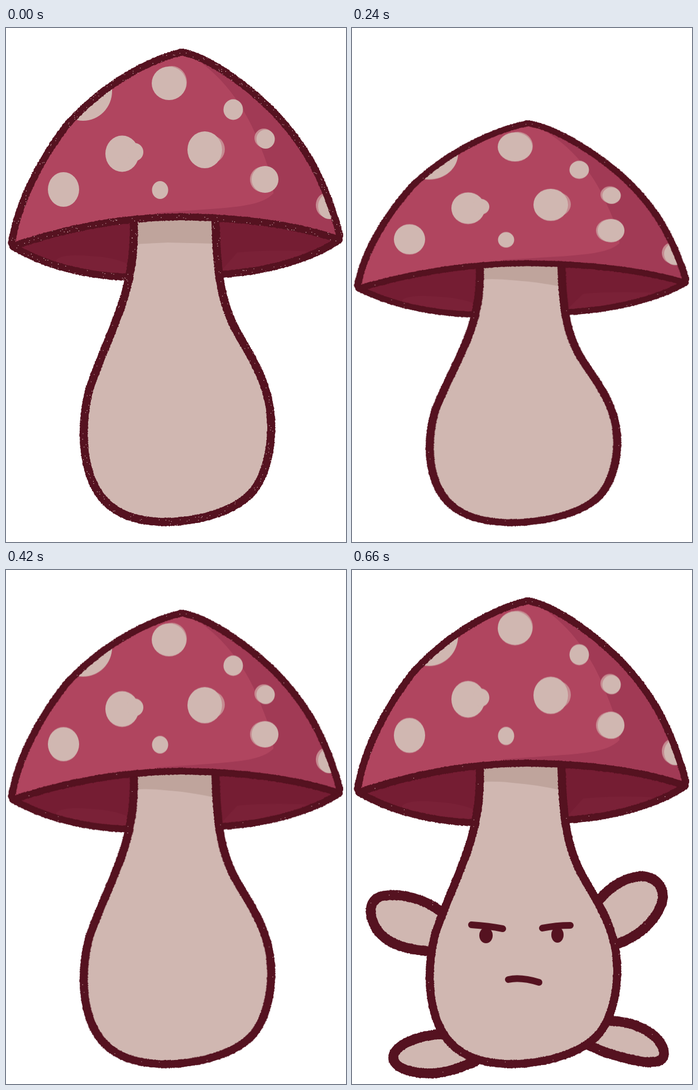
Write an HTML page that moves like this. It is 609 px wide and 920 px high and loops after 0.72 s.

```html
<!DOCTYPE html>
<html lang="en">
<head>
<meta charset="utf-8">
<title>Mushroom</title>
<style>
  html, body { margin: 0; width: 100%; height: 100%; overflow: hidden; background: #fff; }
  svg { display: block; }
  svg * { animation: 720ms step-end infinite; }

  .ink { fill: none; stroke: #551220; stroke-width: 14; stroke-linecap: round; stroke-linejoin: round; }
  .thin { stroke-width: 12; }
  .grain { fill: none; stroke: #551220; stroke-width: 2.4; stroke-linecap: round; }
  .speck { fill: none; stroke: #ecd0cf; stroke-width: 1.1; stroke-linecap: square; }
  .flesh { fill: #d0b7b1; }
  .limb .ink { fill: #d0b7b1; stroke-width: 17; animation-name: weight; }
  .halo { fill: #c58b91; }
  .face { fill: none; stroke: #551220; stroke-linecap: round; visibility: hidden; }
  .pupils { fill: #551220; stroke: none; transform-origin: 0 641px; animation-name: open; }

  #shroom { transform-origin: 0 892px; animation-name: squash; }
  #spots { transform-origin: 0 350px; animation-name: spread; }
  #limbs { visibility: hidden; animation-name: appear; }
  .limb { animation-name: grow; }
  .first { animation-name: first; }
  #tiny { animation-name: tiny; }
  #shut { animation-name: shut; }
  #grumpy { animation-name: grumpy; }

  @keyframes squash {
    0% { transform: scaleY(1); }
    8.333% { transform: scaleY(.98); }
    16.666% { transform: scaleY(.95); }
    25% { transform: scaleY(.915); }
    33.333% { transform: scaleY(.85); }
    41.666% { transform: scaleY(.782); }
    50% { transform: scaleY(.915); }
    58.333% { transform: scaleY(.96); }
    66.666% { transform: scaleY(.98); }
    75% { transform: scaleY(1.038); }
    83.333% { transform: scaleY(1.012); }
    91.666%, 100% { transform: scaleY(.986); }
  }
  @keyframes spread { 0% { transform: none; } 8.333%, 100% { transform: scaleY(1.024); } }
  @keyframes appear { 0% { visibility: hidden; } 66.666%, 100% { visibility: visible; } }
  @keyframes grow { 0% { transform: scale(.87, .92); } 75%, 100% { transform: none; } }
  @keyframes weight { 0% { stroke-width: 22; } 75%, 100% { stroke-width: 17; } }
  @keyframes first { 0% { visibility: visible; } 8.333%, 100% { visibility: hidden; } }
  @keyframes tiny { 0% { visibility: hidden; } 66.666% { visibility: visible; } 75%, 100% { visibility: hidden; } }
  @keyframes shut { 0% { visibility: hidden; } 75% { visibility: visible; } 83.333%, 100% { visibility: hidden; } }
  @keyframes grumpy { 0% { visibility: hidden; } 83.333%, 100% { visibility: visible; } }
  @keyframes open { 0% { transform: scaleY(.6); } 91.666%, 100% { transform: none; } }
</style>
</head>
<body>
<svg width="609" height="920" viewBox="0 0 609 920">
  <defs>
    <clipPath id="dome">
      <path d="M10 388C20 320 55 245 108 175C165 110 245 60 315 43C365 52 440 108 487 158C545 222 575 285 598 379C520 352 420 339 310 338C210 339 110 357 10 391Z"/>
    </clipPath>
  </defs>
  <g id="shroom">
    <g id="limbs" transform="matrix(1 0 0 1.014 0 -12.5)">
      <g class="limb" style="transform-origin:155px 605px">
        <path class="ink" d="M160 612C125 584 78 578 52 584C28 592 30 618 43 641C62 672 105 681 150 683"/>
      </g>
      <g class="limb" style="transform-origin:455px 545px">
        <path class="ink" d="M440 594C465 562 497 547 523 548C553 553 563 578 553 601C540 634 505 662 465 672"/>
      </g>
      <g class="limb" style="transform-origin:440px 735px">
        <path class="ink" d="M455 807C505 806 548 828 558 858C563 880 545 883 520 880C485 874 450 864 420 848"/>
      </g>
      <g class="limb" style="transform-origin:205px 867px">
        <path class="ink" d="M165 831C125 831 85 846 75 866C68 884 90 896 120 900C160 905 190 892 222 879"/>
      </g>
    </g>

    <path fill="#751d33" d="M12 391C110 357 210 339 310 338C420 339 520 352 597 379C550 412 470 436 385 441L218 446C140 443 70 425 12 391Z"/>
    <path fill="#7a2137" d="M88 418Q95 403 150 408Q190 410 216 421V442Q140 440 88 418ZM384 436L414 402Q470 396 540 400Q480 430 384 436Z"/>
    <path class="ink thin" d="M12 391C70 425 140 443 218 446"/>
    <path class="ink thin" d="M385 441C470 436 550 412 597 379"/>

    <path class="flesh" d="M229 342C230 400 224 440 212 480C197 532 170 585 149 648C137 695 136 745 146 785C163 856 212 886 295 884C370 880 430 855 452 815C477 770 482 700 465 648C452 605 430 575 408 533C385 485 378 440 375 342Z"/>
    <path fill="#bfa49c" d="M230 340H374V387Q330 377 290 374Q260 370 230 372Z"/>
    <path class="first" fill="#bfa49c" d="M230 350H374V386L290 384L230 387Z"/>
    <path class="ink" d="M229 342C230 400 224 440 212 480C197 532 170 585 149 648C137 695 136 745 146 785C163 856 212 886 295 884C370 880 430 855 452 815C477 770 482 700 465 648C452 605 430 575 408 533C385 485 378 440 375 342"/>

    <g clip-path="url(#dome)">
      <path fill="#b0455f" d="M0 30H609V400H0Z"/>
      <path fill="#a13a55" d="M325 45C390 85 425 140 447 190C465 235 479 270 479 296C462 314 430 319 380 323L270 331V400H609V45Z"/>
      <g id="spots">
        <g class="halo">
          <ellipse cx="297" cy="97" rx="27" ry="29"/>
          <ellipse cx="367" cy="217" rx="25" ry="25"/>
          <ellipse cx="462" cy="197" rx="17" ry="17"/>
          <ellipse cx="460" cy="271" rx="23" ry="23"/>
          <ellipse cx="574" cy="317" rx="19" ry="22"/>
        </g>
        <g class="flesh">
          <ellipse cx="292" cy="99" rx="31" ry="30"/>
          <ellipse cx="138" cy="113" rx="52" ry="53"/>
          <ellipse cx="208" cy="225" rx="30" ry="32.5"/>
          <ellipse cx="231" cy="222" rx="15" ry="16"/>
          <ellipse cx="356" cy="218" rx="31" ry="33"/>
          <ellipse cx="407" cy="146" rx="17.5" ry="18.5"/>
          <ellipse cx="465" cy="199" rx="16.5" ry="17"/>
          <ellipse cx="464" cy="271" rx="24" ry="24"/>
          <ellipse cx="579" cy="319" rx="20" ry="23"/>
          <ellipse cx="103" cy="289" rx="28" ry="31"/>
          <ellipse cx="276" cy="290" rx="14.5" ry="16"/>
        </g>
      </g>
    </g>
    <path class="ink thin" d="M12 391C110 357 210 339 310 338C420 339 520 352 597 379"/>
    <path class="ink thin" d="M10 386C20 320 55 245 108 175C165 110 245 60 315 43C365 52 440 108 487 158C545 222 575 285 598 372"/>

    <g transform="matrix(1 0 0 1.014 0 -12.5)">
      <g class="face" id="tiny" stroke-width="7">
        <path d="M237 653Q255 653 277 657M338 656Q360 655 372 650"/>
        <path d="M299 722Q312 719 324 722"/>
      </g>
      <g class="face" id="shut" stroke-width="13">
        <path d="M216 648Q245 650 271 655M352 653Q375 649 397 647"/>
        <path stroke-width="15" d="M286 742Q310 740 335 745"/>
      </g>
      <g class="face" id="grumpy" stroke-width="12">
        <path d="M214 635Q245 637 270 642M341 641Q365 636 391 636"/>
        <path d="M280 733Q302 728 335 738"/>
        <g class="pupils">
          <ellipse cx="240" cy="654" rx="12" ry="14"/>
          <ellipse cx="368" cy="653" rx="11" ry="14"/>
        </g>
      </g>
    </g>
  </g>
</svg>
<script>
  let seed = 11;
  const rnd = () => (seed = seed * 16807 % 2147483647) / 2147483647;
  const dot = (x, y) => `M${x.toFixed(1)} ${y.toFixed(1)}h.01`;

  function addPath(after, cls, d) {
    const el = document.createElementNS(after.namespaceURI, 'path');
    el.setAttribute('class', cls);
    el.setAttribute('d', d);
    after.after(el);
  }

  // Crayon texture: dabs along both edges, pale specks inside the line.
  function roughen(path) {
    const limb = path.closest('.limb');
    const half = limb ? 8.5 : path.matches('.thin') ? 6 : 7;
    const len = path.getTotalLength();
    let grain = '', few = '', many = '';
    for (let s = 0; s < len; s += 2) {
      const p = path.getPointAtLength(Math.min(s, len - 1));
      const q = path.getPointAtLength(Math.min(s + 1, len));
      const a = Math.atan2(q.y - p.y, q.x - p.x);
      const at = off => dot(p.x - Math.sin(a) * off, p.y + Math.cos(a) * off);
      for (const side of [-1, 1]) grain += at(side * (half - 1.8 + rnd() * 1.8));
      const off = (rnd() * 2 - 1) * half;
      if (rnd() < .03) few += at(off);
      if (rnd() < .24) many += at(off);
    }
    if (!limb) addPath(path, 'speck first', many);
    addPath(path, 'speck', few);
    addPath(path, 'grain', grain);
  }

  document.querySelectorAll('.ink').forEach(roughen);
</script>
</body>
</html>
```
